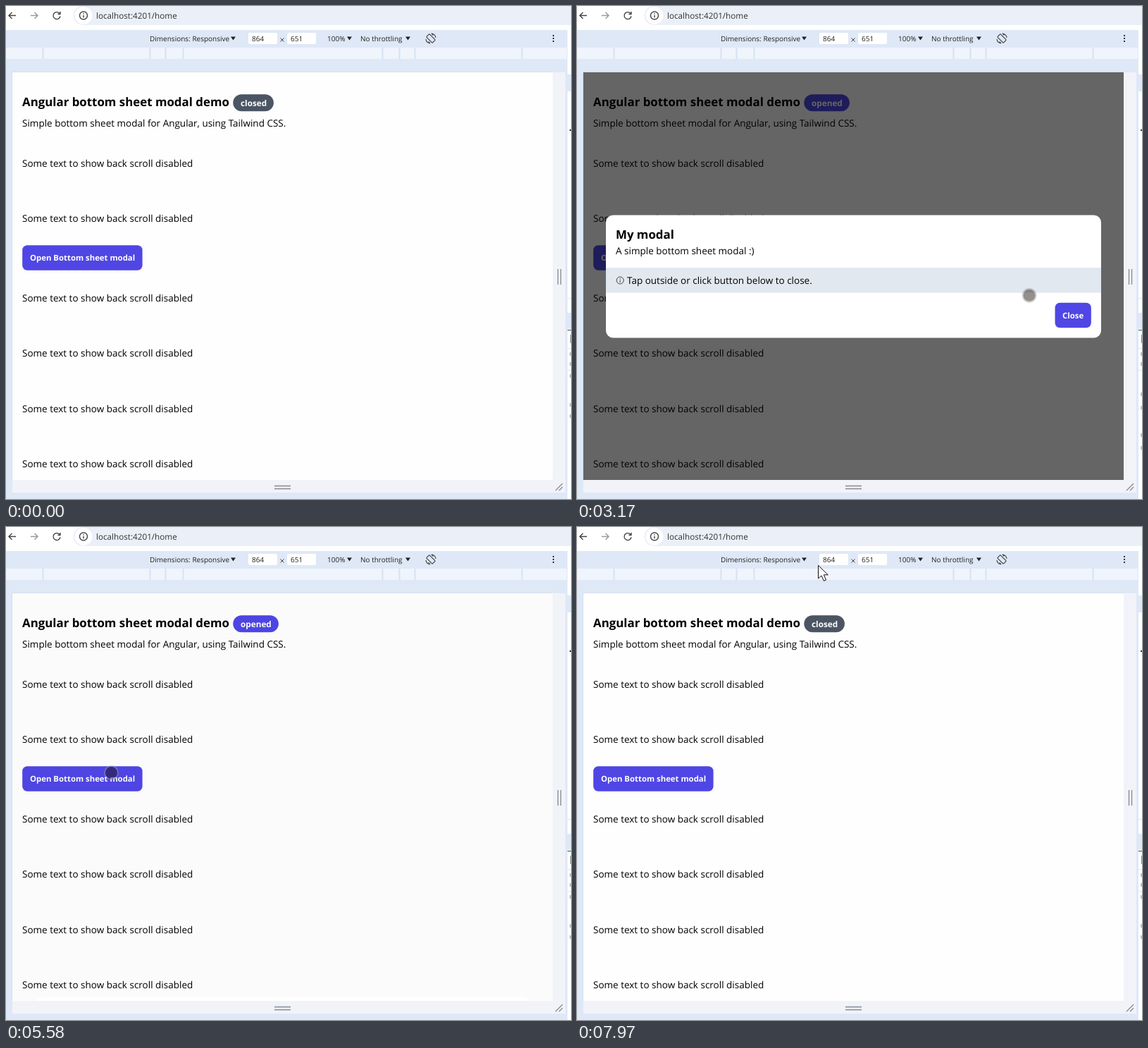
An HTML page that plays this animation: 802 px wide and 699 px high, repeating every 8 s.

```html
<!DOCTYPE html>
<html lang="en">
<head>
<meta charset="utf-8">
<title>Bottom sheet modal demo</title>
<style>
html, body { margin: 0; width: 100%; height: 100%; overflow: hidden; background: #fff; }
svg { display: block; width: 802px; height: 699px; }
text { font: 13.5px "Open Sans", "Noto Sans", sans-serif; fill: #000; text-rendering: geometricPrecision; white-space: pre; }
.title { font-size: 16.87px; font-weight: 700; }
.pill { font-size: 11.75px; font-weight: 700; fill: #fff; }
.btn { font-size: 11.37px; font-weight: 700; fill: #fff; }
.url { font-size: 11.7px; fill: #333; }
.tool { font-size: 10px; fill: #222; }
.line { fill: none; stroke: #444; stroke-width: 1.4; }
</style>
</head>
<body>
<svg viewBox="0 0 802 699">
  <defs>
    <clipPath id="view"><rect x="9" y="94" width="767" height="578"/></clipPath>
  </defs>

  <!-- browser bar -->
  <rect width="802" height="34" fill="#fff"/>
  <path d="M802 0H109a13.5 13.5 0 0 0 0 27H802z" fill="#ebeff8"/>
  <circle cx="110" cy="13.5" r="12.5" fill="#fff"/>
  <g class="line">
    <path d="M14 13.5H4M8.5 9L4 13.5L8.5 18"/>
    <path d="M35 13.5H45M40.5 9L45 13.5L40.5 18" stroke="#999"/>
    <path d="M76 10.5A5 5 0 1 0 77 14.5M77 8V11.5H73.5"/>
    <circle cx="110" cy="13.5" r="5.5"/>
    <path d="M110 13V16.5M110 10.3V11.7"/>
  </g>
  <text class="url" x="128" y="17.5">localhost:4201/home</text>

  <!-- device toolbar and ruler -->
  <rect y="34" width="797" height="665" fill="#dfe8f6"/>
  <rect y="59" width="796" height="16" fill="#f0f4fc"/>
  <path id="ruler" stroke="#d5e2f4" stroke-width="2"/>
  <rect x="344" y="38" width="41" height="16" rx="2" fill="#fff"/>
  <rect x="399" y="38" width="41" height="16" rx="2" fill="#fff"/>
  <g id="tools"></g>
  <path d="M319 43.5h7l-3.5 5zM484 43.5h7l-3.5 5zM567 43.5h7l-3.5 5z" fill="#222"/>
  <path d="M389.5 45.5l5 5M394.5 45.5l-5 5" stroke="#444"/>
  <g class="line" style="stroke-width:1.2">
    <rect x="-3" y="-6" width="6" height="12" rx="1" transform="translate(603 46) rotate(-45)"/>
    <path d="M604 39A7 7 0 0 1 610 45M602 53A7 7 0 0 1 596 47M604 39l2.500 2.500M602 53l-2.500-2.500"/>
  </g>
  <path d="M776 41h2v2h-2zM776 45h2v2h-2zM776 49h2v2h-2z" fill="#333"/>

  <!-- resize handles -->
  <rect x="9" y="94" width="785" height="596" fill="#f1f3f9"/>
  <path d="M381 680.5H404M381 684.5H404M783.5 373V395M787.5 373V395M780 687L790 677M785 687L790 682" stroke="#858990" stroke-width="1.3"/>

  <!-- side panel -->
  <rect x="797" y="34" width="5" height="665" fill="#fff"/>
  <path d="M797 97h5v24h-5zM797 435h5v23h-5zM797 414h5v1h-5zM797 485h5v1h-5zM797 516h5v1h-5z" fill="#dfe8f6"/>
  <path d="M797 459.5h5" stroke="#355"/>
  <path d="M800 175h2v2h-2z" fill="#333"/>
  <path id="panel" stroke="#888"/>

  <!-- page -->
  <g clip-path="url(#view)">
    <rect x="9" y="94" width="767" height="578" fill="#fefefe"/>
    <text class="title" x="23" y="142">Angular bottom sheet modal demo</text>
    <rect id="badge" x="322.300" y="125.200" height="24" rx="12"/>
    <text id="state" class="pill" x="333" y="142"></text>
    <text x="23" y="171">Simple bottom sheet modal for Angular, using Tailwind CSS.</text>
    <g id="filler"></g>
    <rect x="23.200" y="339.300" width="170.400" height="35.500" rx="7" fill="#4f46e5"/>
    <text class="btn" x="34" y="361.300">Open Bottom sheet modal</text>
    <rect id="scrim" x="9" y="94" width="767" height="578"/>
    <g id="sheet">
      <rect x="41" width="703" height="174" rx="10.5" fill="#fff"/>
      <text class="title" x="55" y="33.300">My modal</text>
      <text x="55" y="55">A simple bottom sheet modal :)</text>
      <rect x="41" y="74.500" width="703" height="35.500" fill="#e2e8f0"/>
      <g class="line" style="stroke-width:1">
        <circle cx="61.200" cy="92.500" r="5"/>
        <path d="M61.200 92V95.500M61.200 89.500V91"/>
      </g>
      <text x="71" y="97.500">Tap outside or click button below to close.</text>
      <rect x="678.500" y="124.300" width="51.300" height="35.500" rx="7" fill="#4f46e5"/>
      <text class="btn" x="689" y="146.300">Close</text>
    </g>
  </g>
  <path d="M9 93.500H776M8.500 94V672" stroke="#d3dcea" stroke-width=".7"/>

  <!-- pointer -->
  <g id="pointer">
    <circle id="halo" r="18.5" fill="#f5f032" fill-opacity=".6"/>
    <g id="touch">
      <circle r="9.5" fill="none" stroke="#999" stroke-opacity=".45" stroke-width="2"/>
      <circle r="8.5" fill="#140800" fill-opacity=".45"/>
    </g>
    <path id="arrow" d="M.5 .5V19L5 15L8.500 22.500L11.500 21L8.300 13.800H14.300Z" fill="#fff" stroke="#111"/>
  </g>
</svg>
<script>
const LOOP = 8000, OPENS = [1580, 5510], CLOSES = [4500, 6400];
const REST = 296.5, HIDDEN = 670;
const $ = id => document.getElementById(id);
const clamp = x => Math.min(1, Math.max(0, x));
const set = (id, attrs) => { for (const k in attrs) $(id).setAttribute(k, attrs[k]); };
const show = (id, on) => { $(id).style.display = on ? '' : 'none'; };
const label = (x, y, text, cls = '') => `<text class="${cls}" x="${x}" y="${y}">${text}</text>`;

$('tools').innerHTML = [
  [204, 'Dimensions: Responsive'], [349, '864'], [404, '651'], [456, '100%'], [503, 'No throttling']
].map(([x, s]) => label(x, 50, s, 'tool')).join('');
$('filler').innerHTML = [227.5, 305.5, 419, 497.3, 575.5, 653.7]
  .map(y => label(23, y, 'Some text to show back scroll disabled')).join('');
set('ruler', { d: [52, 204, 226, 251, 534, 558, 580, 732].map(x => `M${x + .5} 59V75`).join('') });

const marks = ys => 'M801.5 466V478' + ys.map(y => `M801 ${y}v5`).join('');
const PANEL = { closed: marks([491, 505, 522, 563, 579]), opened: marks([491, 505, 548, 567, 606, 624]) };

// Pointer way points: time, x, y
const PATH = [
  [110, 497.5, 508.5], [180, 306.5, 391.5], [450, 306.5, 391.5], [520, 311.5, 385], [660, 311.5, 385],
  [1520, 149, 347.5], [1720, 149, 347.5], [2070, 142.5, 353], [2470, 142.5, 353], [2750, 300, 261],
  [2950, 490, 323], [3240, 689.5, 437.5], [4640, 689.5, 437.5], [5240, 149.5, 342.5], [5310, 149.5, 348.5],
  [5650, 149.5, 348.5], [5800, 300, 312], [5930, 393, 245], [6070, 436.5, 224], [6700, 436.5, 224],
  [6900, 403, 203], [7090, 422.5, 175.5], [7280, 422.5, 175.5], [7600, 344.5, 110], [7970, 342, 54]
];

function pointerAt(t) {
  const i = PATH.findIndex(p => p[0] > t);
  if (i < 0) return PATH.at(-1).slice(1);
  const [t0, x0, y0] = PATH[i - 1], [t1, x1, y1] = PATH[i];
  const k = (t - t0) / (t1 - t0);
  return [x0 + (x1 - x0) * k, y0 + (y1 - y0) * k];
}

const backOut = x => 1 + 2.2 * (x - 1) ** 3 + 1.2 * (x - 1) ** 2;
const smooth = x => x * x * (3 - 2 * x);

// Sheet top, scrim opacity and state; the page reacts 70 ms after a press
function sheetAt(t) {
  const last = list => Math.max(-1, ...list.map(c => c + 70).filter(c => c <= t));
  const opened = last(OPENS), closed = last(CLOSES);
  if (opened > closed) {
    const dt = t - opened;
    return { open: true, top: HIDDEN - (HIDDEN - REST) * backOut(clamp(dt / 490)), dim: Math.min(.6, .01 + dt / 600) };
  }
  if (closed < 0) return { open: false, top: 760, dim: 0 };
  const k = clamp((t - closed) / 300);
  return { open: false, top: REST + 456 * smooth(k), dim: .6 * (1 - k) };
}

function draw(t) {
  const { open, top, dim } = sheetAt(t);
  $('state').textContent = open ? 'opened' : 'closed';
  set('badge', { width: open ? 64.6 : 57.6, fill: open ? '#4f46e5' : '#4b5563' });
  set('scrim', { 'fill-opacity': dim });
  set('sheet', { transform: `translate(0 ${top})` });
  set('panel', { d: PANEL[dim > .3 ? 'opened' : 'closed'] });

  show('pointer', t >= PATH[0][0]);
  if (t < PATH[0][0]) return;
  const [x, y] = pointerAt(t);
  const outside = y < 94;
  set('pointer', { transform: `translate(${x} ${y})` });
  show('arrow', outside);
  show('touch', !outside);
  show('halo', [...OPENS, ...CLOSES].some(c => t >= c && t < c + 70));
}

function tick() {
  draw(performance.now() % LOOP);
  requestAnimationFrame(tick);
}
tick();
</script>
</body>
</html>
```
